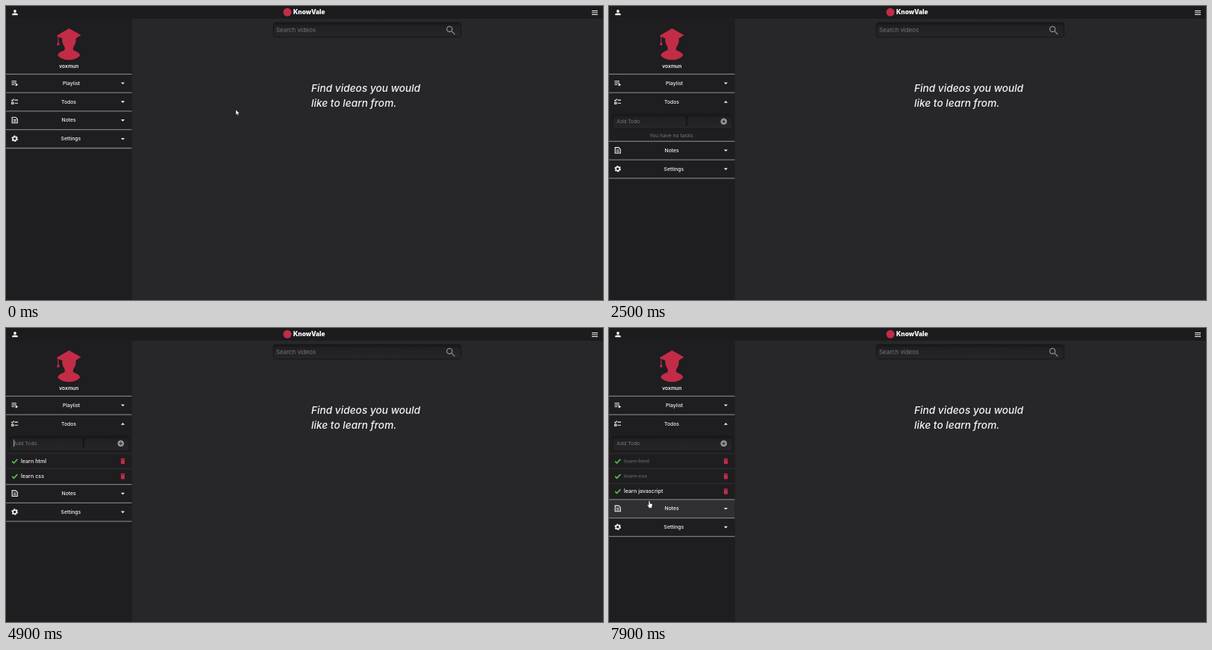
Animation of 800x394 px, one loop 8000 ms. Source, as an HTML page:

```html
<!DOCTYPE html>
<html lang="en">
<head>
<meta charset="utf-8">
<title>Video learning dashboard</title>
<style>
html, body { margin: 0; width: 100%; height: 100%; overflow: hidden; background: #272629; }
svg { display: block; width: 800px; height: 394px; font: 500 6.8px Inter, "Open Sans", sans-serif; fill: #f4f4f5; }
.line { stroke: #7c7b7f; stroke-width: 1.3; }
.thin { stroke: #353438; stroke-width: .8; }
.icon { fill: none; stroke: #f4f4f5; stroke-width: 1.1; }
.red { fill: #c22c47; }
.muted { fill: #77767a; font-weight: 400; }
.hover { fill: #302f32; }
.done text { fill: #545357; text-decoration: line-through; }
.headline { font-size: 13.7px; font-weight: 550; font-style: italic; }
</style>
</head>
<body>
<svg viewBox="0 0 800 394">
  <defs>
    <linearGradient id="well" x2="0" y2="1">
      <stop offset="0" stop-color="#161518"/>
      <stop offset=".25" stop-color="#212023"/>
      <stop offset="1" stop-color="#262528"/>
    </linearGradient>
    <path id="arrow" d="M0 0V6.9L1.6 5.5L2.7 7.8L3.8 7.3L2.8 5H4.9Z" fill="#fff" stroke="#111" stroke-width=".4"/>
    <path id="beam" d="M-1.8 -5H1.8M0 -5V5M-1.8 5H1.8" fill="none" stroke="#08080a" stroke-width=".9"/>
    <path id="hand" d="M-.9 .7Q0 -.5 .9 .7V3.4L3.6 4.2Q4.4 4.6 4.2 5.8L3.4 8.3V9.8H-.8V8.6L-2.6 6.2Q-3 5 -1.8 5.2L-.9 6Z" fill="#fff" stroke="#111" stroke-width=".5"/>
    <path id="tick" d="M-3.6 .2L-1.3 2.5L3.6 -2.6" fill="none" stroke="#4fc143" stroke-width="1.7"/>
    <path id="bin" class="red" d="M-3 -3.4H-1.4L-.8 -4H.8L1.4 -3.4H3V-2.5H-3ZM-2.5 -2H2.5V3Q2.5 3.8 1.7 3.8H-1.7Q-2.5 3.8 -2.5 3Z"/>
  </defs>

  <rect width="800" height="394" fill="#272629"/>
  <rect y="17" width="169" height="377" fill="#1e1d20"/>
  <rect width="800" height="17" fill="#1c1b1e"/>

  <circle cx="12" cy="7" r="1.9"/>
  <path d="M8.2 12.2V11Q8.6 9.5 12 9.5T15.8 11V12.2Z"/>
  <circle class="red" cx="377" cy="8.3" r="5.5"/>
  <text x="385" y="11.2" style="font-size:8.3px;font-weight:900">KnowVale</text>
  <path class="icon" d="M785 6.5H793M785 9H793M785 11.5H793"/>

  <rect x="358.3" y="22.3" width="251.4" height="19.4" rx="3.5" fill="url(#well)" stroke="#161518"/>
  <text class="muted" x="362" y="35" style="font-size:7.9px">Search videos</text>
  <g fill="none" stroke="#8b8a8e" stroke-width="1.3">
    <circle cx="594.3" cy="30.9" r="3.6"/><path d="M597 33.6L601.4 38"/>
  </g>
  <g class="headline">
    <text x="409" y="114.7">Find videos you would</text>
    <text x="409" y="134.9">like to learn from.</text>
  </g>

  <g class="red">
    <path d="M67.8 39.8L84.5 30L100.5 39L93.5 43.5H75.5L70.4 41.6V48L72 52.5H68L69.3 48V41Z"/>
    <path d="M75.5 42H93.5Q94.5 49 91 54Q88.5 58 91 59.8Q98.5 62 99.3 66.5Q94 72.3 84.3 72.3T69.3 66.5Q70 62 77.5 59.8Q80 58 78 54Q74.5 49 75.5 42Z"/>
  </g>
  <text x="84.3" y="83.2" text-anchor="middle" style="font-weight:600">voxmun</text>

  <g id="panel">
    <rect x="5" y="145" width="160" height="19.5" rx="3.5" fill="url(#well)" stroke="#18171a"/>
    <text id="entry" x="10.3" y="156.9"></text>
    <path id="caret" d="M0 149.5V159" stroke="#d8d8da" stroke-width=".8"/>
    <circle cx="153.8" cy="154.8" r="4.3" fill="#98979b"/>
    <path d="M151.4 154.8H156.2M153.8 152.4V157.2" stroke="#242326"/>
    <text id="none" class="muted" x="84.3" y="175.8" text-anchor="middle">You have no tasks.</text>
    <g id="tasks"></g>
  </g>
  <g id="menu"></g>
  <use id="cursor"/>
</svg>
<script>
const $ = id => document.getElementById(id);
const TOP = 91, ROW = 24.8, TASK = 20.2;

// Menu sections: label, its left edge, icon drawn around (11.7, 12.4)
const sections = [
  ['Playlist', 76, '<path class="icon" d="M7.5 9.8H14M7.5 12H14M7.5 14.2H11.5"/><path d="M12.8 12.6L16.3 14.6L12.8 16.6Z"/>'],
  ['Todos', 74, '<path class="icon" d="M7.3 10L8.5 11.2L10.8 8.8M11.5 10.3H16M11.5 14.5H16M7.7 13.2H9.9V15.4H7.7Z"/>'],
  ['Notes', 74.5, '<path class="icon" d="M8.2 8.6H13L15.3 10.9V16.2H8.2ZM9.8 12H13.7M9.8 14.2H13.7"/>'],
  ['Settings', 73.5, '<circle class="icon" cx="11.7" cy="12.4" r="3.5" stroke-dasharray="2 1.665" style="stroke-width:1.6"/><circle class="icon" cx="11.7" cy="12.4" r="2.5" style="stroke-width:1.5"/>']
];
$('menu').innerHTML = sections.map(([name, x, icon], i) => `<g>
  <rect class="hover" width="168.5" height="${ROW}"/>
  <path class="line" d="M0 .3H168.5"/>${icon}
  <text x="${x}" y="14.9">${name}</text>
  <path class="chevron" d="M-2.5 -1.2H2.5L0 1.4Z"/>
  ${i === 3 ? `<path class="line" d="M0 ${ROW + .3}H168.5"/>` : ''}</g>`).join('');
const rows = [...$('menu').children];

// Tasks: text, typing start, typing steps, field cleared, listed, ticked off
const tasks = [
  ['learn html', 2800, 7, 3700, 4000, 7100],
  ['learn css', 4100, 5, 4800, 4800, 7700],
  ['learn javascript', 5000, 6, 5700, 5700, Infinity]
];
$('tasks').innerHTML = tasks.map(([name], i) => `<g transform="translate(0 ${178.2 + i * TASK})">
  <path class="thin" d="M0 -10H168.5"/><use href="#tick" x="11.8" y=".3"/>
  <text x="20" y="2.4" style="font-size:7.15px">${name}</text><use href="#bin" x="156.5" y=".3"/></g>`).join('');
const items = [...$('tasks').children];

// Pointer stops: time, x, y
const stops = [
  [0, 308, 139], [100, 327, 112], [200, 205, 76], [300, 91, 49], [900, 91, 49],
  [1100, 374, 4], [1700, 374, 4], [2100, 159, 126.5], [2300, 159, 126.5],
  [2500, 104, 154], [5700, 104, 154], [6100, 159, 150], [6500, 159, 150],
  [6900, 13, 177], [7300, 13, 177], [7400, 13, 181], [7600, 13, 197],
  [7700, 13, 197], [7900, 54, 231.5]
];

function pointer(t) {
  const i = stops.findIndex(s => s[0] >= t);
  const b = stops[i], a = stops[Math.max(0, i - 1)];
  const k = b[0] > a[0] ? (t - a[0]) / (b[0] - a[0]) : 1;
  return [a[1] + (b[1] - a[1]) * k, a[2] + (b[2] - a[2]) * k];
}

const show = (el, on) => el.setAttribute('visibility', on ? 'visible' : 'hidden');

function render(t) {
  const open = t >= 2300;
  const count = tasks.filter(k => t >= k[4]).length;
  const extra = !open ? 0 : count ? 28.3 + count * TASK : 40.4;
  const [x, y] = pointer(t);

  let overRow = false;
  rows.forEach((row, i) => {
    const top = TOP + i * ROW + (i > 1 ? extra : 0);
    const over = x < 168 && y >= top && y < top + ROW;
    overRow = overRow || over;
    row.setAttribute('transform', `translate(0 ${top})`);
    show(row.querySelector('.hover'), over);
    row.querySelector('.chevron').setAttribute('transform',
      `translate(156.5 12.7) rotate(${i === 1 && open ? 180 : 0})`);
  });

  $('panel').style.display = open ? '' : 'none';
  show($('none'), open && !count);
  items.forEach((item, i) => {
    show(item, t >= tasks[i][4]);
    item.classList.toggle('done', t >= tasks[i][5]);
  });

  const current = tasks.find(k => t >= k[1] && t < k[3]);
  let typed = '';
  if (current) {
    const [name, start, steps] = current;
    typed = name.slice(0, Math.ceil(name.length * ((t - start) / 100 + 1) / steps));
  }
  const entry = $('entry');
  entry.textContent = typed || 'Add Todo';
  entry.setAttribute('class', typed ? '' : 'muted');
  const end = typed ? entry.getComputedTextLength() : 0;
  $('caret').setAttribute('transform', `translate(${10.7 + end} 0)`);
  show($('caret'), t >= 2600 && t < 6100);

  const inField = open && x < 148 && y > 145 && y < 165;
  const onButton = open && y > 145 && (x < 18 || (x > 148 && x < 165));
  const hand = overRow || onButton || (y < 15 && x > 368 && x < 430);
  $('cursor').setAttribute('href', inField ? '#beam' : hand ? '#hand' : '#arrow');
  $('cursor').setAttribute('transform', `translate(${x} ${y})`);
}

let last = -1;
function tick() {
  const t = Math.floor(performance.now() % 8000 / 100) * 100;
  if (t !== last) render(last = t);
  requestAnimationFrame(tick);
}
tick();
</script>
</body>
</html>
```
